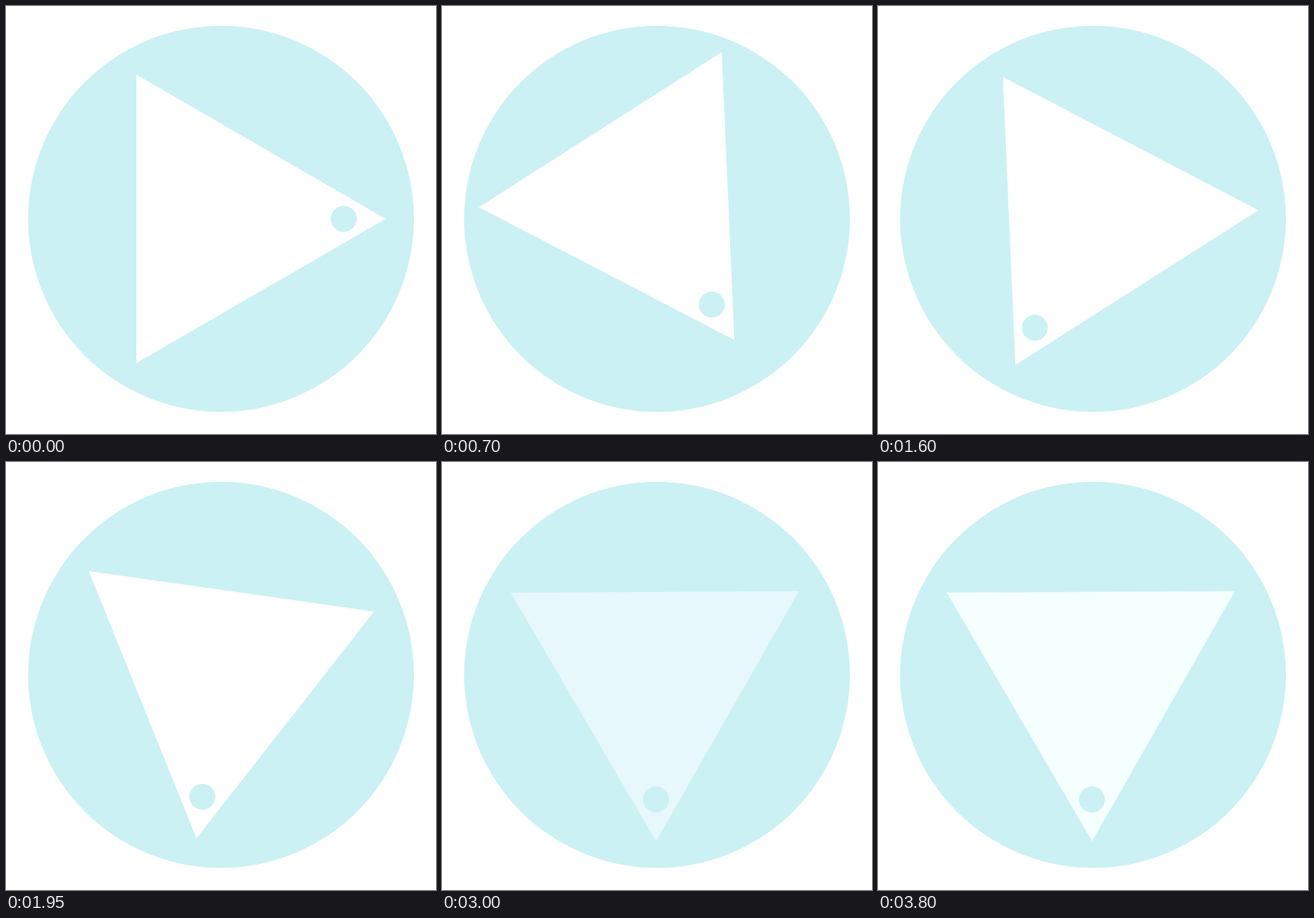
Recreate the animation shown at these times as an HTML page with a canvas. Size 564 by 561 pixels, loop 4050 ms.

```html
<!DOCTYPE html>
<html lang="en">
<head>
<meta charset="utf-8">
<title>Turning triangle</title>
<style>
  html, body { margin: 0; width: 100%; height: 100%; overflow: hidden; background: #fff; }
  canvas { display: block; }
</style>
</head>
<body>
<canvas id="stage" width="564" height="561"></canvas>
<script>
const ctx = document.getElementById('stage').getContext('2d');
const LOOP = 4050, STEP = 50;
const BLUE = '#cbf1f4';

// The triangle turns around the middle of its bounding box.
const poses = [
  { t: 0,    x: 334.5, y: 279,   deg: 0 },
  { t: 1500, x: 251,   y: 323.8, deg: 123.1 },
  { t: 2100, x: 280,   y: 333.8, deg: 89.7 }
];

// Hard colour changes: start time, fill.
const fills = [
  [0, '#ffffff'],
  [2350, '#ebfbfb'],
  [2600, '#e1f6f9'],
  [3000, '#e6f8fc'],
  [3150, '#e9fafb'],
  [3350, '#ebfbfb'],
  [3500, '#eefcfc'],
  [3700, '#f1fdfc'],
  [3800, '#f5fffd']
];

function poseAt(t) {
  const last = poses[poses.length - 1];
  if (t >= last.t) return last;
  const i = poses.findIndex(p => p.t > t);
  const a = poses[i - 1], b = poses[i];
  const k = (t - a.t) / (b.t - a.t);
  const mix = key => a[key] + (b[key] - a[key]) * k;
  return { x: mix('x'), y: mix('y'), deg: mix('deg') };
}

function fillAt(t) {
  return fills.filter(f => f[0] <= t).pop()[1];
}

function disc(x, y, r) {
  ctx.fillStyle = BLUE;
  ctx.beginPath();
  ctx.arc(x, y, r, 0, Math.PI * 2);
  ctx.fill();
}

function draw(t) {
  const pose = poseAt(t);
  ctx.fillStyle = '#fff';
  ctx.fillRect(0, 0, 564, 561);
  disc(282, 279, 253);

  ctx.save();
  ctx.translate(pose.x, pose.y);
  ctx.rotate(pose.deg * Math.PI / 180);
  ctx.fillStyle = fillAt(t);
  ctx.beginPath();
  ctx.moveTo(-163.5, -189);
  ctx.lineTo(163.5, 0);
  ctx.lineTo(-163.5, 189);
  ctx.fill();
  disc(108.5, 0, 17);
  ctx.restore();
}

const start = performance.now();
function tick() {
  const t = (performance.now() - start) % LOOP;
  draw(Math.floor(t / STEP) * STEP);
  requestAnimationFrame(tick);
}
tick();
</script>
</body>
</html>
```
